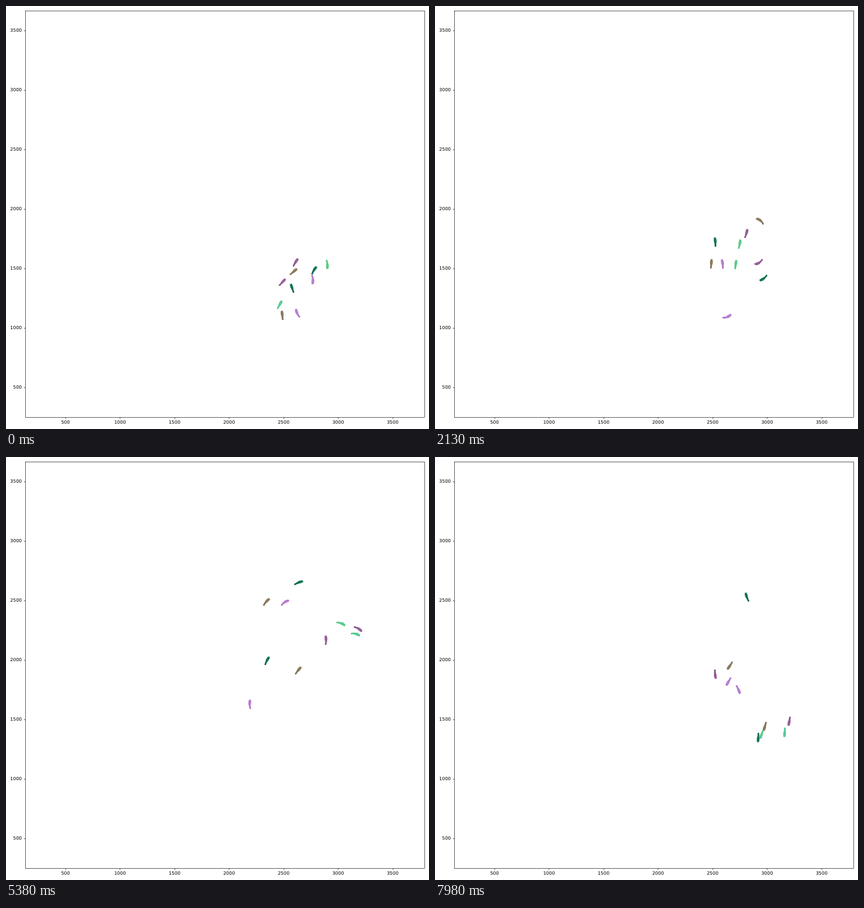
Write an HTML page that moves like this. It is 640 by 640 pixels and loops after 8000 ms.

```html
<!DOCTYPE html>
<html lang="en">
<head>
<meta charset="utf-8">
<title>Swimming tracks</title>
<style>
  html, body { margin: 0; width: 100%; height: 100%; overflow: hidden; background: #fff; }
  svg { display: block; width: 100vw; height: 100vh; }
  text { font: 6.94px "DejaVu Sans", sans-serif; fill: #000; text-rendering: geometricPrecision; }
  .axis { fill: none; stroke: #000; stroke-width: .56; }
  .fish path { stroke-linejoin: round; stroke-linecap: round; }
</style>
</head>
<body>
<svg id="stage" viewBox="0 0 640 640">
  <rect class="axis" x="29.5" y="7.5" width="604" height="615"/>
</svg>
<script>
const LOOP = 8000, STEP = 25, HALF = 6.5;
const TIMES = [0, 1350, 2130, 3450, 5380, 6680, 7980];
const stage = document.getElementById('stage');
const school = [];

function add(parent, tag, attrs, text = '') {
  const node = document.createElementNS('http://www.w3.org/2000/svg', tag);
  for (const name in attrs) node.setAttribute(name, attrs[name]);
  node.textContent = text;
  return parent.appendChild(node);
}

for (let value = 500; value <= 3500; value += 500) {
  const x = 7.5 + value * 0.165, y = 667 - value * 0.18;
  add(stage, 'path', { class: 'axis', d: `M${Math.floor(x) + .5} 622.5v2.4M29.5 ${y + .5}h-2.4` });
  add(stage, 'text', { x, y: 632, 'text-anchor': 'middle' }, value);
  add(stage, 'text', { x: 24, y: y + 2, 'text-anchor': 'end' }, value);
}

const between = (a, b) => Math.atan2(b.y - a.y, b.x - a.x);
const turn = (from, to) => Math.atan2(Math.sin(to - from), Math.cos(to - from));

// A fish passes its waypoints in turn, heading along the bisector of the legs
// on either side; the open ends carry on the turn of the nearest leg.
function swim([edge, fill, spine], route) {
  const stops = route.split(' ').map(pair => {
    const [x, y] = pair.split(',').map(Number);
    return { x, y };
  });
  const last = stops.length - 1;
  const legs = stops.slice(1).map((stop, i) => between(stops[i], stop));
  for (let i = 1; i < last; i++) stops[i].heading = legs[i - 1] + turn(legs[i - 1], legs[i]) / 2;
  stops[0].heading = legs[0] + turn(stops[1].heading, legs[0]) / 2;
  stops[last].heading = legs[last - 1] + turn(stops[last - 1].heading, legs[last - 1]) / 2;

  const group = add(stage, 'g', { class: 'fish' });
  const body = add(group, 'path', { fill, stroke: edge });
  const line = add(group, 'path', {
    fill: 'none', stroke: spine, 'stroke-width': .9, 'stroke-dasharray': '1.6 1.7'
  });
  school.push({ group, body, line, stops });
}

const plum = ['#98559c', '#a76fa8', '#62506a'];
const olive = ['#867250', '#a0825a', '#68677a'];
const forest = ['#14774c', '#1d8a5c', '#17355f'];
const mint = ['#58cb76', '#62cf9b', '#45b9bd'];
const lilac = ['#b272cf', '#c08dd9', '#a96fc0'];

swim(plum, '438,388 495,359 490,388 454,378 484,277 472,238 424,329');
swim(plum, '418,418 455,374 471,344 476,278 533,260 544,322 536,400');
swim(olive, '435,402 487,345 492,325 438,354 442,323 483,308 499,408');
swim(olive, '418,468 415,420 418,390 423,323 394,219 462,229 446,316');
swim(forest, '466,400 507,380 497,412 443,413 395,308 449,298 489,425');
swim(forest, '433,427 425,397 424,357 417,303 443,190 484,218 472,212');
swim(mint, '486,391 464,430 455,391 492,323 529,268 533,310 529,417');
swim(mint, '414,452 439,406 461,360 457,285 507,252 520,297 494,420');
swim(lilac, '464,414 449,440 435,390 438,295 422,220 465,251 444,340');
swim(lilac, '441,465 437,463 442,470 438,440 369,374 422,317 459,352');

const point = (x, y) => `${x.toFixed(2)},${y.toFixed(2)}`;

// Outline along the spine, from a slim tail at -1 to a fuller head at 1.
function shape(bend) {
  const left = [], right = [], spine = [];
  for (let u = -1; u <= 1; u += .125) {
    const x = u * HALF, y = bend * (u * u - .4);
    const width = .7 + .9 * Math.exp(-(((u - .4) / .6) ** 2));
    left.push(point(x, y - width));
    right.unshift(point(x, y + width));
    spine.push(point(x, y));
  }
  return { outline: `M${left.concat(right).join(' ')}Z`, spine: `M${spine.join(' ')}` };
}

// Position, velocity and acceleration on a cubic Hermite curve.
function hermite(p0, p1, m0, m1, u) {
  const c = 3 * (p1 - p0) - 2 * m0 - m1, d = 2 * (p0 - p1) + m0 + m1;
  return [p0 + u * (m0 + u * (c + u * d)), m0 + u * (2 * c + 3 * u * d), 2 * c + 6 * u * d];
}

function pose(stops, time) {
  const next = TIMES.findIndex((t, i) => i && (time < t || i === TIMES.length - 1));
  const a = stops[next - 1], b = stops[next];
  const span = TIMES[next] - TIMES[next - 1];
  const u = Math.min(1, (time - TIMES[next - 1]) / span);
  const reach = Math.max(span * .02, Math.hypot(b.x - a.x, b.y - a.y));
  const along = (axis, trig) =>
    hermite(a[axis], b[axis], reach * trig(a.heading), reach * trig(b.heading), u);
  const [x, vx, ax] = along('x', Math.cos), [y, vy, ay] = along('y', Math.sin);
  const curvature = (vx * ay - vy * ax) / Math.hypot(vx, vy) ** 3;
  const bend = Math.max(-1.5, Math.min(1.5, curvature * HALF ** 2 / 2));
  return { x, y, angle: Math.atan2(vy, vx) * 180 / Math.PI, bend };
}

function draw(now) {
  const time = Math.floor((now % LOOP) / STEP) * STEP;
  for (const { group, body, line, stops } of school) {
    const { x, y, angle, bend } = pose(stops, time);
    const { outline, spine } = shape(bend);
    group.setAttribute('transform', `translate(${point(x, y)}) rotate(${angle.toFixed(2)})`);
    body.setAttribute('d', outline);
    line.setAttribute('d', spine);
  }
}

let start;
function tick(now) {
  start ??= now;
  draw(Math.max(0, now - start));
  requestAnimationFrame(tick);
}
draw(0);
requestAnimationFrame(tick);
</script>
</body>
</html>
```
